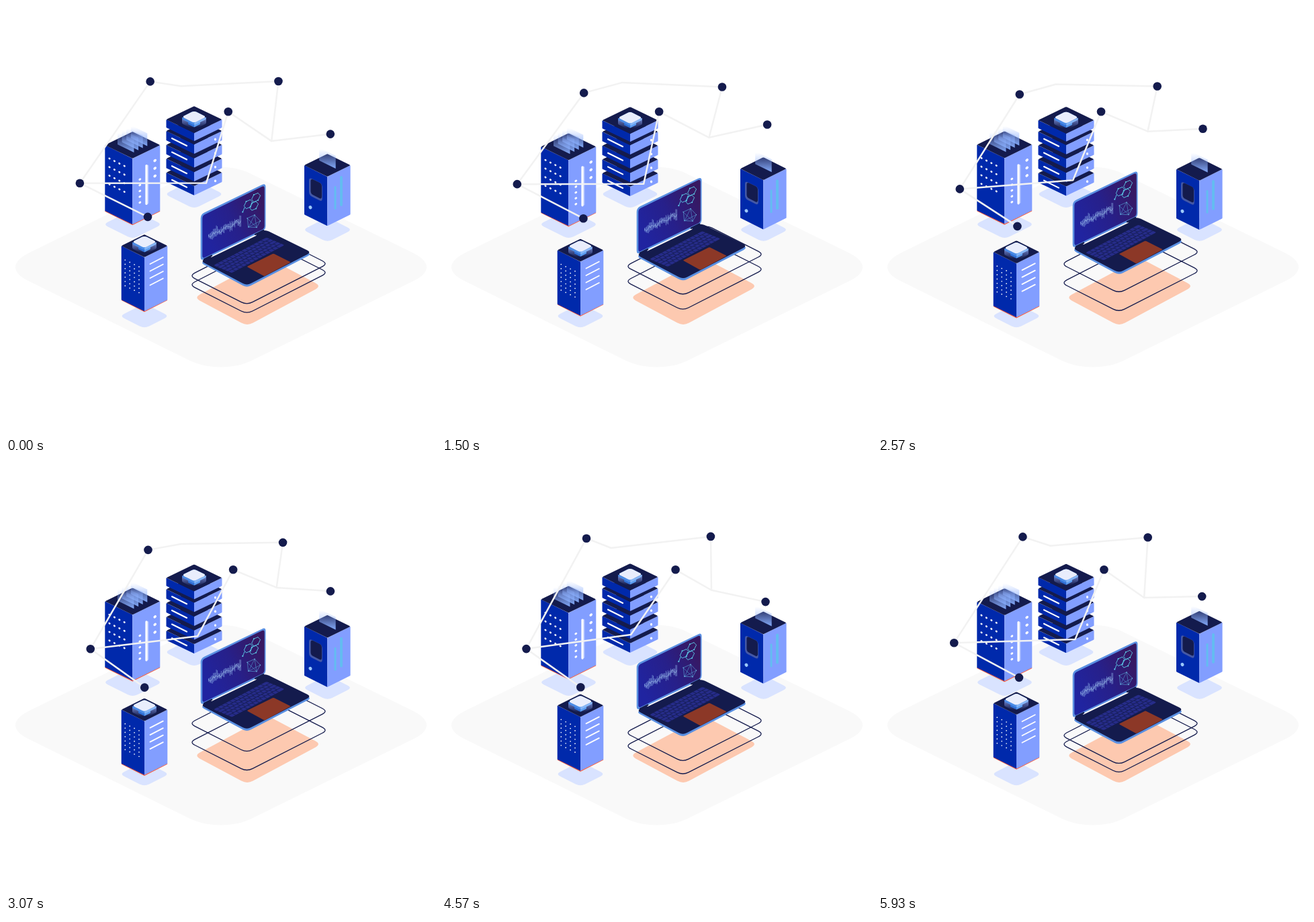
Write an HTML page with a canvas that moves like this. It is 640 px wide and 640 px high and loops after 6 s.

```html
<!DOCTYPE html>
<html>
<head>
<meta charset="utf-8">
<title>Isometric network</title>
<style>
html, body { margin: 0; width: 100%; height: 100%; overflow: hidden; background: #fff; }
canvas { display: block; }
</style>
</head>
<body>
<canvas id="stage" width="640" height="640"></canvas>
<script>
const c = document.getElementById('stage').getContext('2d');
const LOOP = 6000, PERIOD = 6400, RATE = 0.014;
const NAVY = '#141b4d', BLUE = '#0029ab', PALE = '#829eff', WHITE = '#fff', SHADE = '#d9e3ff';
let now = 0;

const swing = (peak, t = now) => Math.cos(2 * Math.PI * (t - peak) / PERIOD);

// Draws a part shifted vertically by its sine, relative to its place at time 0.
function bob(amp, peak, draw) {
  c.save();
  c.translate(0, amp * (swing(peak) - swing(peak, 0)));
  draw();
  c.restore();
}

// A point at the given distance from a towards b.
function along(a, b, dist) {
  const k = dist / Math.hypot(b[0] - a[0], b[1] - a[1]);
  return [a[0] + (b[0] - a[0]) * k, a[1] + (b[1] - a[1]) * k];
}

// Each corner is softened by a curve that starts and ends `cut` away from it.
function trace(pts, cut = 0) {
  const n = pts.length;
  c.beginPath();
  pts.forEach((p, i) => {
    c.lineTo(...along(p, pts[(i + n - 1) % n], cut));
    c.quadraticCurveTo(...p, ...along(p, pts[(i + 1) % n], cut));
  });
  c.closePath();
}

function poly(pts, fill, cut) {
  trace(pts, cut);
  c.fillStyle = fill;
  c.fill();
}

function outline(pts, color, width, cut) {
  trace(pts, cut);
  c.strokeStyle = color;
  c.lineWidth = width;
  c.stroke();
}

function line(pts, color, width, cap = 'round') {
  c.beginPath();
  pts.forEach(p => c.lineTo(...p));
  c.strokeStyle = color;
  c.lineWidth = width;
  c.lineCap = cap;
  c.lineJoin = 'round';
  c.stroke();
}

function dot(x, y, r, color = WHITE, ry = r, tilt = 0) {
  c.beginPath();
  c.ellipse(x, y, r, ry, tilt, 0, 7);
  c.fillStyle = color;
  c.fill();
}

function fade(y0, y1, from, to) {
  const g = c.createLinearGradient(0, y0, 0, y1);
  g.addColorStop(0, from);
  g.addColorStop(1, to);
  return g;
}

const rhomb = (x, y, w, h) => [[x - w, y], [x, y - h], [x + w, y], [x, y + h]];

// (x, y) is the middle of the top face.
function box(x, y, w, h, tall, left = BLUE, right = PALE, top = NAVY, cut = 1.5) {
  poly([[x - w, y], [x, y + h], [x, y + h + tall], [x - w, y + tall]], left, cut / 2);
  poly([[x + w, y], [x, y + h], [x, y + h + tall], [x + w, y + tall]], right, cut / 2);
  poly(rhomb(x, y, w, h), top, cut);
}

function redEdge(x, y, w, h) {
  line([[x - w + .5, y], [x, y + h], [x + w - .5, y]], '#ff5a35', 1.4);
}

function chip(x, y) {
  const glow = fade(y + 4, y + 16, 'rgba(150,175,255,.6)', 'rgba(150,175,255,0)');
  box(x, y + 2, 18, 9, 8, glow, glow, 'rgba(80,110,200,.4)', 3);
  box(x, y + 7, 9, 4.5, 4, '#2f6fd6', '#5b9cf0', '#5b9cf0');
  box(x, y, 18, 9, 3.5, '#4b8be6', '#86b6f7', '#5b9cf0', 4);
  poly(rhomb(x, y, 18, 9), '#e9edfc', 4);
}

function sheet(x, y) {
  poly([[x, y], [x + 24.5, y + 12], [x + 24.5, y - 7], [x, y - 19]],
    fade(y - 17, y + 10, 'rgba(150,180,255,0)', 'rgba(135,175,255,.9)'));
}

function ground() {
  c.beginPath();
  c.moveTo(272, 527);
  c.bezierCurveTo(300, 541, 340, 541, 367, 527);
  c.lineTo(605, 410);
  c.bezierCurveTo(633, 397, 633, 381, 605, 367);
  c.lineTo(367, 251);
  c.bezierCurveTo(340, 236, 300, 236, 272, 251);
  c.lineTo(35, 367);
  c.bezierCurveTo(7, 381, 7, 397, 35, 410);
  c.fillStyle = '#f9f9f9';
  c.fill();
  poly(rhomb(188.5, 325, 44, 21.7), SHADE, 8);
  poly(rhomb(280, 280, 44, 21.7), SHADE, 8);
  poly(rhomb(206, 461.5, 37, 18.5), SHADE, 8);
  poly(rhomb(478.5, 333, 37, 18.5), SHADE, 8);
  poly([[280, 434], [359, 476.3], [469.3, 417], [390, 375]], '#fdc9b0', 10);
}

function stackTower() {
  for (let i = 4; i > 0; i--) {
    const y = 165.4 + 20.6 * i;
    box(280, y, 41.5, 20, 14);
    line([[247, y + 11], [269, y + 22]], WHITE, 2.2);
    dot(311.5, y + 12.5, 1.6, WHITE, 1.9);
  }
  box(280, 169, 41.5, 20, 12);
  chip(280, 165);
}

function dottedTower() {
  redEdge(188.3, 305.4, 40.8, 20);
  box(188.3, 207, 41, 20, 98);
  for (let i = 3; i >= 0; i--) sheet(166 + 6.6 * i, 206 - 3.2 * i);
  for (let row = 0; row < 4; row++)
    for (let col = 0; col < 4; col++)
      dot(154 + 7.4 * col, 227 + 12.8 * row + 3.7 * col, 1.7, WHITE, 1.3, .7);
  line([[210.6, 238], [210.6, 293]], '#b4c5ff', 3.4);
  line([[209, 237.5], [209, 294.5]], WHITE, 3.2);
  for (let i = 0; i < 5; i++) dot(199.3, 258 + 8.6 * i, 2.1, WHITE, 1.5, -.6);
  for (let i = 0; i < 3; i++) dot(221.7, 230 + 11.5 * i, 2.6, WHITE, 1.8, -.7);
}

function frontTower() {
  redEdge(206, 437.7, 34, 17);
  box(206, 357, 34.3, 17, 80.3);
  chip(206, 351);
  for (let row = 0; row < 7; row++)
    for (let col = 0; col < 4; col++)
      dot(177.3 + 6.9 * col, 378 + 6.4 * row + 3.4 * col, .85);
  for (let i = 0; i < 4; i++)
    line([[214.5, 384 + 10.5 * i], [233.8, 374 + 10.5 * i]], WHITE, 1.8);
}

function windowTower() {
  box(478.3, 237, 34.3, 17, 73.3);
  sheet(466.2, 230);
  poly([[451, 255], [470.8, 264.8], [470.8, 291.5], [451, 281.5]], '#4458a6', 5);
  poly([[453.5, 256.5], [470, 264.5], [470, 287.8], [453.5, 279.5]], NAVY, 4);
  dot(453, 299.7, 2.4, '#9cc9fa', 2.7, -.4);
  line([[490, 269.5], [490, 301.5]], '#62bdf0', 2.8);
  line([[499, 255], [499, 296]], '#62bdf0', 3.8);
}

function screenArt() {
  // Signal bars around a rising baseline.
  let seed = 7;
  const rand = () => (seed = seed * 16807 % 2147483647) / 2147483647;
  const trend = [];
  for (let i = 0; i < 34; i++) {
    const x = 301.5 + i * 1.45;
    const mid = 342.5 - i * .7 + 1.6 * Math.sin(i * .62);
    const half = 2 + rand() * 6;
    line([[x, mid - half * (.6 + rand() * .8)], [x, mid + half]], 'rgba(160,200,245,.75)', .7, 'butt');
    trend.push([x, mid + (rand() - .5) * 5]);
  }
  line(trend, '#a9cdf2', .6);

  const cyan = '#5ccbe8';
  for (const [x, y] of [[372, 285], [360.7, 295], [369, 297.5]]) {
    const hex = [];
    for (let a = 0; a < 6; a++) {
      const dx = 6.4 * Math.cos(a * Math.PI / 3);
      hex.push([x + dx, y + 6.2 * Math.sin(a * Math.PI / 3) - .42 * dx]);
    }
    outline(hex, cyan, .9);
    dot(...hex[1], 1, cyan);
    dot(...hex[4], 1, cyan);
  }
  line([[355, 300], [352.3, 307]], cyan, .9);
  dot(352.3, 306.5, 1.1, cyan);

  const net = [[359, 316], [370, 311], [378.5, 320], [373, 329.5], [361, 329]];
  outline(net, '#559bd0', .7);
  for (const [a, b] of [[0, 3], [1, 3], [1, 4], [2, 4]]) line([net[a], net[b]], '#559bd0', .6);
  net.forEach(p => dot(...p, .7, '#79bfe6'));
}

function laptop() {
  const edge = '#5a90e2';
  poly([[289, 382], [385, 335], [455, 369.3], [358.5, 419.3]], edge, 7);
  poly([[289.5, 379.5], [385, 332.5], [454.5, 366.5], [358.5, 416]], NAVY, 7);
  line([[306, 372], [371, 340.7]], '#f9f9f9', 3.4);

  // Keys follow the two axes of the keyboard.
  const key = (u, v) => [309 + 78.5 * u + 27 * v, 386 - 41.5 * u + 11.3 * v];
  poly([key(0, 0), key(1, 0), key(1, 1), key(0, 1)], '#262c89', 2);
  for (let row = 1; row < 5; row++) line([key(0, row / 5), key(1, row / 5)], NAVY, .8);
  for (let row = 0; row < 5; row++)
    for (let col = 1; col < 13; col++) {
      const u = (col + row % 2 * .4) / 13.4;
      line([key(u, row / 5), key(u, (row + 1) / 5)], NAVY, .8, 'butt');
    }
  poly([[358.5, 388], [398, 368.3], [424, 381.3], [384.5, 402.3]], '#8c3827', 1.5);

  const g = c.createLinearGradient(295, 345, 385, 300);
  g.addColorStop(0, '#2024a0');
  g.addColorStop(.5, '#27208a');
  g.addColorStop(1, '#371861');
  poly([[289.7, 310], [386.5, 263.5], [386.5, 333], [289.7, 379.5]], edge, 6);
  poly([[292.3, 312], [384.7, 267], [384.7, 331.2], [292.3, 376]], g, 4);
  line([[295, 377], [306, 371.5]], NAVY, 2.5);
  line([[371, 340], [383, 334]], NAVY, 2.5);
  screenArt();
}

function frame(bottom) {
  outline([[272.8, bottom - 41.5], [358.5, bottom + 2], [479.2, bottom - 59.5], [393, bottom - 103]], NAVY, 1.3, 9.5);
}

function network() {
  const point = (x, dx, y, dy, peak) => [x + dx * swing(peak), y + dy * swing(peak)];
  const left = point(118.2, 10, 269.8, 7.3, 3800);
  const low = point(208.5, -3, 323.7, 11.8, 3800);
  const topLeft = point(213.2, -2.6, 119.5, 12.8, 2200);
  const topRight = point(408.2, 9.5, 114, 7, 1900);
  const inner = point(335.2, 12.5, 157.3, 0, 4430);
  const right = point(482.8, -1.3, 190.9, 14.5, 4780);
  const bend = point(291, 11, 259.6, 6.3, 900);
  const crest = point(260, 8.5, 119.5, -5.6, 1550);
  const fork = point(399, -4, 192.3, 9.2, 300);
  const gray = '#f2f2f2';
  line([low, left, topLeft, crest, topRight, fork], gray, 2.5);
  line([left, bend, inner, fork, right], gray, 2.5);
  for (const p of [left, low, topLeft, topRight, inner, right]) dot(...p, 6.3, NAVY);
}

function draw(time) {
  now = Math.floor((time % LOOP + 3) * RATE) / RATE;
  c.clearRect(0, 0, 640, 640);
  ground();
  bob(5, 4800, () => frame(456.3));
  bob(10.5, 5580, () => frame(443));
  bob(1.1, 1700, stackTower);
  bob(4, 1200, dottedTower);
  bob(5, 2600, frontTower);
  bob(3.9, 2200, windowTower);
  bob(10.4, 0, laptop);
  network();
}

const start = performance.now();
function tick() {
  draw(performance.now() - start);
  requestAnimationFrame(tick);
}
tick();
</script>
</body>
</html>
```
